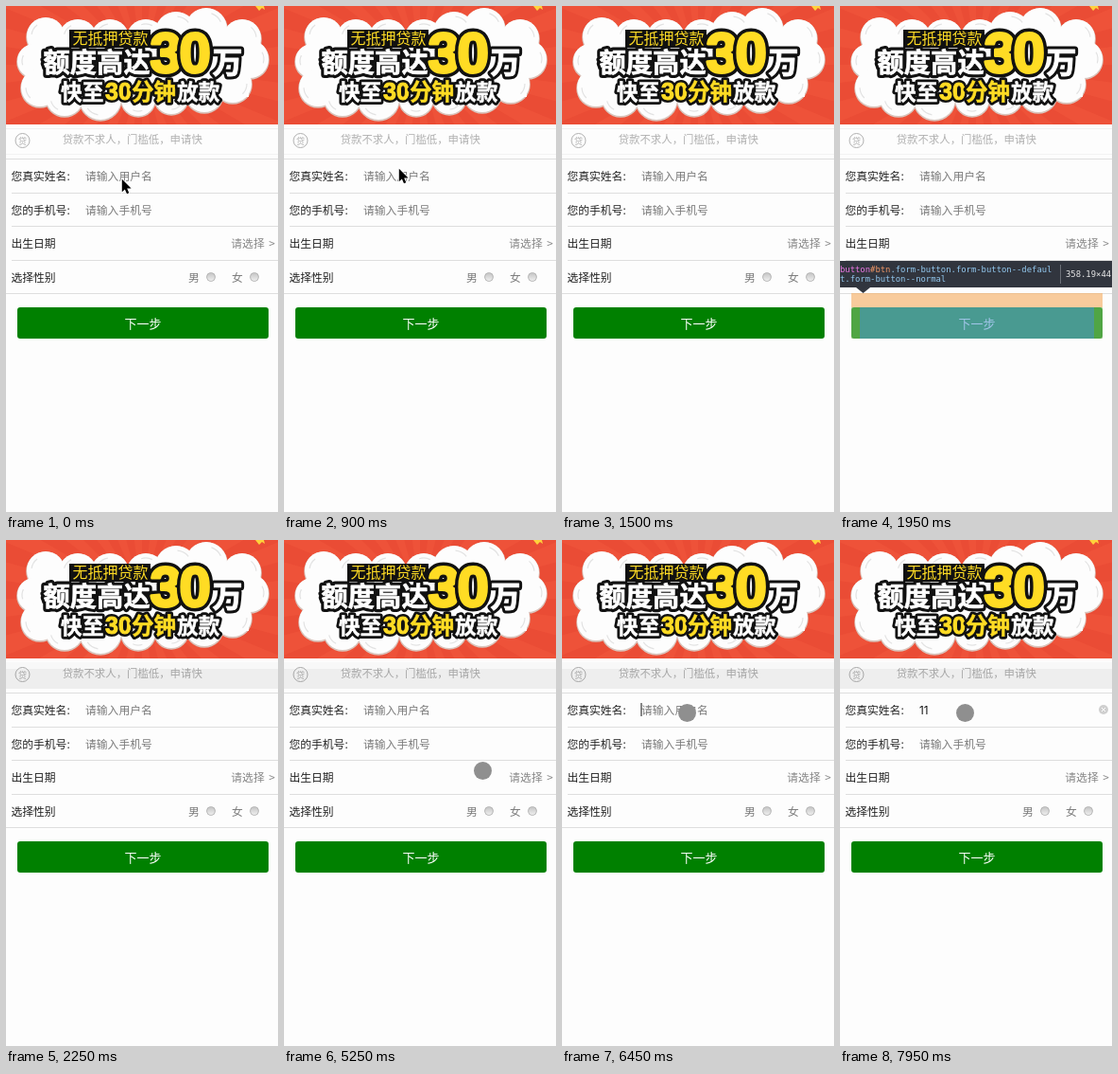
An HTML page with a canvas that plays this animation: 288 by 534 pixels, repeating every 8 s.

```html
<!DOCTYPE html>
<html lang="zh-CN">
<head>
<meta charset="utf-8">
<title>Loan form</title>
<style>
  html, body { margin: 0; width: 100%; height: 100%; overflow: hidden; background: #fdfdfd; }
  canvas { display: block; width: 288px; height: 534px; }
</style>
</head>
<body>
<canvas id="stage"></canvas>
<script>
const W = 288, H = 534, LOOP = 8000;
const CJK = '"Noto Sans CJK SC", "Noto Sans CJK", sans-serif';
const MONO = '"DejaVu Sans Mono", monospace';
const canvas = document.getElementById('stage');
const ratio = window.devicePixelRatio || 1;
canvas.width = W * ratio;
canvas.height = H * ratio;
const ctx = canvas.getContext('2d');

// Pointer steps: [start ms, kind, x, y]; arrows use their tip, dots their centre.
const POINTER = [
  [0, 'arrow', 122, 182], [150, 'dot', 123.5, 183.5], [300, 'arrow', 122, 182],
  [900, 'arrow', 121, 171], [1050, 'arrow', 116, 171], [1200, 'arrow', 115, 173],
  [1350, 'arrow', 150, 173], [1500, 'none', 0, 0],
  [5250, 'dot', 210.5, 243.5], [5400, 'dot', 153.5, 221.5], [5550, 'dot', 138.5, 203.5],
  [5700, 'dot', 133.5, 186.5], [5850, 'dot', 132.5, 182.5]
];

// Cloud lobes: x, y, radius.
const LOBES = [
  [42, 32, 20], [30, 58, 18], [36, 86, 20], [62, 96, 20], [100, 98, 22], [140, 98, 18],
  [175, 96, 18], [210, 92, 20], [240, 82, 20], [258, 56, 20], [250, 34, 20],
  [212, 24, 22], [180, 28, 22], [148, 34, 20], [110, 34, 20], [76, 34, 20]
];

const between = (t, from, to) => t >= from && t < to;

function box(x, y, w, h, color) {
  ctx.fillStyle = color;
  ctx.fillRect(x, y, w, h);
}

function disc(x, y, r, color) {
  ctx.fillStyle = color;
  ctx.beginPath();
  ctx.arc(x, y, r, 0, Math.PI * 2);
  ctx.fill();
}

function shape(points, color) {
  ctx.fillStyle = color;
  ctx.beginPath();
  points.forEach(([x, y]) => ctx.lineTo(x, y));
  ctx.closePath();
  ctx.fill();
}

function text(str, x, y, color, font = '11.8px ' + CJK, align = 'left') {
  ctx.font = font;
  ctx.textAlign = align;
  ctx.fillStyle = color;
  ctx.fillText(str, x, y);
}

// Heavy lettering: a black outline below, then a fill thickened by `swell`.
function headline(str, x, y, size, color, outline, swell, family = CJK) {
  ctx.font = `900 ${size}px ${family}`;
  ctx.textAlign = 'left';
  ctx.lineJoin = 'round';
  for (const [ink, width] of [['#111', outline], [color, swell]]) {
    ctx.strokeStyle = ink;
    ctx.lineWidth = width;
    ctx.strokeText(str, x, y);
  }
  ctx.fillStyle = color;
  ctx.fillText(str, x, y);
}

function banner() {
  ctx.save();
  ctx.beginPath();
  ctx.rect(0, 0, W, 125);
  ctx.clip();
  box(0, 0, W, 125, '#ee5239');
  for (let i = 0; i < 24; i++) {
    const ray = a => [144 + 220 * Math.cos(a), 62 + 220 * Math.sin(a)];
    const a = i * Math.PI / 12;
    shape([[144, 62], ray(a), ray(a + 0.13)], '#ea4c35');
  }
  LOBES.forEach(([x, y, r]) => disc(x, y + 1, r + 0.8, '#d9c4bc'));
  LOBES.forEach(([x, y, r]) => disc(x, y, r, '#fdfdfd'));
  box(32, 30, 225, 66, '#fdfdfd');
  ctx.strokeStyle = '#e2e2e2';
  ctx.lineWidth = 1.2;
  LOBES.forEach(([x, y, r]) => {
    const a = Math.atan2(y - 62, (x - 144) / 2);
    ctx.beginPath();
    ctx.arc(x, y, r - 5, a - 0.4, a + 0.4);
    ctx.stroke();
  });
  shape([[264, 0], [268, 5], [271, 2], [274, 4], [273, 0]], '#ffd23c');

  const yellow = '#ffdc24', digits = '"Liberation Sans", Arial, sans-serif';
  box(67, 25, 86, 19, '#111');
  text('无抵押贷款', 70.5, 40, yellow, '500 16px ' + CJK);
  headline('额度高达', 39.5, 69.5, 28.3, '#fff', 7, 0.7);
  headline('万', 218.5, 70.5, 32, '#fff', 7, 1);
  headline('3', 152.5, 70, 60, yellow, 10, 3, digits);
  headline('0', 183.5, 70, 60, yellow, 10, 3, digits);
  headline('快至', 58, 98.5, 22.7, '#fff', 6, 0.5);
  headline('30', 105, 98.5, 25, yellow, 6, 1, digits);
  headline('分钟', 133, 98.5, 23.5, yellow, 6, 0.5);
  headline('放款', 181, 98.5, 22.7, '#fff', 6, 0.5);
  ctx.restore();
}

function strip(shaded) {
  if (shaded) {
    box(0, 129, W, 7, '#f8f8f8');
    box(0, 136, W, 21, '#eeeeee');
  } else {
    box(0, 129, W, 1, '#f0f0f0');
    box(0, 156, W, 1, '#f3f3f3');
  }
  const ink = shaded ? '#a6a6a6' : '#b0b0b0';
  ctx.strokeStyle = ink;
  ctx.lineWidth = 1;
  ctx.beginPath();
  ctx.arc(17.5, 142, 7.5, 0, Math.PI * 2);
  ctx.stroke();
  text('贷', 17.5, 145.5, ink, '9px ' + CJK, 'center');
  text('贷款不求人，门槛低，申请快', 59.7, 145, ink, (shaded ? '' : '500 ') + '11.4px ' + CJK);
}

function radio(x, y) {
  const shade = ctx.createLinearGradient(0, y - 4, 0, y + 4);
  shade.addColorStop(0, '#c6c6c6');
  shade.addColorStop(1, '#eeeeee');
  disc(x, y, 4.8, '#ababab');
  disc(x, y, 3.9, shade);
}

function clearIcon(x, y) {
  disc(x, y, 5, '#cfcfcf');
  ctx.strokeStyle = '#fff';
  ctx.lineWidth = 1;
  ctx.beginPath();
  for (const s of [-1, 1]) {
    ctx.moveTo(x - 2, y - 2 * s);
    ctx.lineTo(x + 2, y + 2 * s);
  }
  ctx.stroke();
}

function form(t) {
  const ink = '#222', hint = '#7b7b7b';
  [161, 197, 232, 268, 303].forEach((y, i) => {
    const left = i % 4 ? 6 : 0;
    box(left, y, W - left, 1, '#dedede');
  });
  ['您真实姓名:', '您的手机号:', '出生日期', '选择性别'].forEach((label, i) =>
    text(label, 5.4, 184 + i * 35.5, ink));

  const typed = t < 7050 ? '' : t < 7350 ? '1' : '11';
  if (typed) {
    text(typed, 84, 184, '#111', '11.6px Inter, sans-serif');
    clearIcon(279, 179);
  } else {
    text('请输入用户名', 84, 184, hint);
  }
  if (between(t, 6450, 6900)) box(83.5, 172, 1, 14, '#111');
  if (between(t, 7050, 7950)) box(typed.length > 1 ? 94 : 89, 172, 1, 14, '#111');

  text('请输入手机号', 84, 219.5, hint);
  text('请选择', 238.3, 254.5, '#888');
  text('>', 284.7, 254.5, '#888', undefined, 'right');
  text('男', 193, 290.5, hint);
  text('女', 239, 290.5, hint);
  radio(217, 286);
  radio(263, 286);

  ctx.fillStyle = '#008000';
  ctx.beginPath();
  ctx.roundRect(12, 318, 266, 33, 3);
  ctx.fill();
  text('下一步', 145, 339.7, '#fff', '13px ' + CJK, 'center');
}

// Runs of [string, colour] set one after another.
function codeLine(runs, x, y) {
  for (const [str, color] of runs) {
    text(str, x, y, color, '8.9px ' + MONO);
    x += ctx.measureText(str).width;
  }
}

const PANEL = '#31353e', TAG = '#ee78e6', ID = '#f29766', CLASS = '#93c9f0', SIZE = '#e8e8e8';
const CONTENT = 'rgba(111,168,220,.66)', PADDING = 'rgba(147,196,125,.55)', MARGIN = 'rgba(246,178,107,.66)';

function inspectButton() {
  box(12, 303, 266, 15, MARGIN);
  box(12, 318, 9, 33, PADDING);
  box(269, 318, 9, 33, PADDING);
  box(21, 318, 248, 33, CONTENT);
  box(0, 269, W, 28, PANEL);
  shape([[17, 297], [32, 297], [24.5, 303]], PANEL);
  codeLine([['button', TAG], ['#btn', ID], ['.form-button.form-button--defaul', CLASS]], 0, 281);
  codeLine([['t.form-button--normal', CLASS]], 0, 291);
  box(233, 273, 1, 20, '#6c7078');
  codeLine([['358.19×44', SIZE]], 239, 286);
}

function inspectFields() {
  box(0, 161, W, 143, CONTENT);
  box(0, 137, 99, 18, PANEL);
  shape([[3, 155], [19, 155], [11, 161]], PANEL);
  codeLine([['div', TAG], ['.mid', CLASS]], 4, 149);
  box(47, 141, 1, 10, '#6c7078');
  codeLine([['398×192', SIZE]], 53, 149);
}

function arrow(x, y) {
  ctx.save();
  ctx.translate(x + 0.8, y + 0.8);
  ctx.scale(0.93, 0.93);
  const points = [[0, 0], [0, 14.5], [3.3, 11.4], [5.6, 16.6], [8, 15.5], [5.8, 10.5], [10.5, 10.5]];
  ctx.strokeStyle = '#fff';
  ctx.lineWidth = 1.6;
  shape(points, '#000');
  ctx.stroke();
  shape(points, '#000');
  ctx.restore();
}

function pointer(t) {
  const [, kind, x, y] = POINTER.findLast(step => t >= step[0]);
  if (kind === 'arrow') arrow(x, y);
  if (kind === 'dot') disc(x, y, 9.5, '#8f8f8f');
}

function draw(now) {
  const t = now % LOOP;
  ctx.setTransform(ratio, 0, 0, ratio, 0, 0);
  box(0, 0, W, H, '#fdfdfd');
  banner();
  strip(t >= 2100);
  form(t);
  if (between(t, 1950, 2100)) inspectButton();
  if (between(t, 2100, 2250)) inspectFields();
  pointer(t);
}

const start = performance.now();
function tick() {
  draw(performance.now() - start);
  requestAnimationFrame(tick);
}
tick();
</script>
</body>
</html>
```
